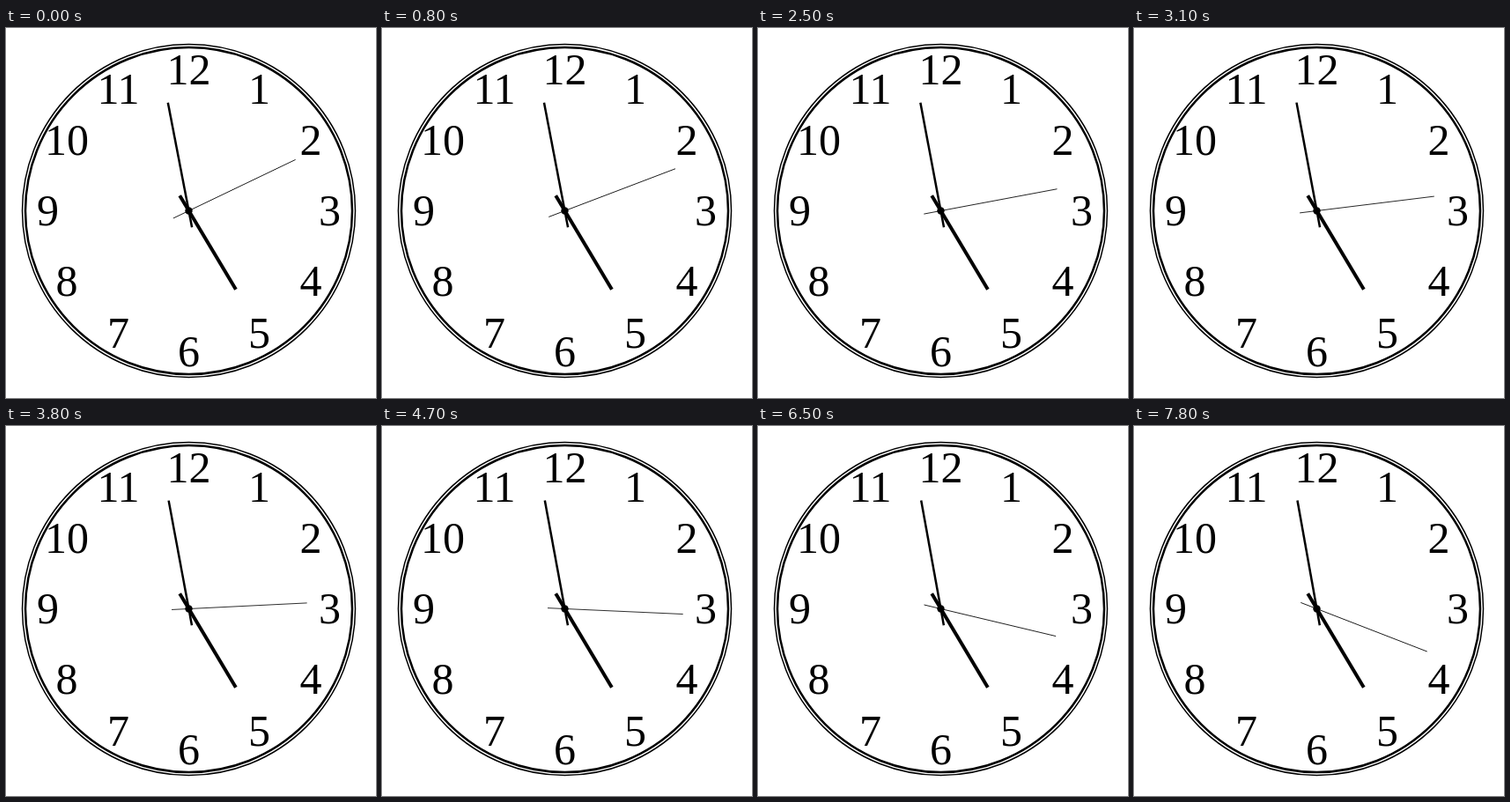
Animation, 420 px wide and 420 px high, one loop 7.9 s. Source, as an HTML page:

```html
<!DOCTYPE html>
<html>
<head>
<meta charset="utf-8">
<style>
html, body { margin: 0; height: 100%; overflow: hidden; background: #fff; }
svg { display: block; width: 100vw; height: 100vh; }
text { font: 50px "Liberation Serif", "Times New Roman", serif; text-anchor: middle; }
circle { fill: none; stroke: #000; }
line { stroke: #000; }
</style>
</head>
<body>
<svg viewBox="-207.5 -207.5 420 420">
  <circle r="189" stroke-width="1.5"/>
  <circle r="185.5" stroke-width="2.5"/>
  <g id="numerals"></g>
  <line id="hour" y1="20" y2="-104" stroke-width="4"/>
  <line id="minute" y1="19" y2="-125" stroke-width="2.5"/>
  <line id="second" y1="19.5" y2="-134.3" stroke-width="0.8"/>
  <circle r="4.2" style="fill: #000; stroke: none"/>
</svg>
<script>
const LOOP = 7900, STEP = 100;
const START = 4 * 3600 + 58 * 60 + 10.73; // seconds past twelve
const byId = id => document.getElementById(id);

let numerals = '';
for (let n = 1; n <= 12; n++) {
  const a = n * Math.PI / 6;
  numerals += `<text x="${160 * Math.sin(a)}" y="${16.7 - 160 * Math.cos(a)}">${n}</text>`;
}
byId('numerals').innerHTML = numerals;

function turn(id, degrees) {
  byId(id).setAttribute('transform', `rotate(${degrees})`);
}

function draw() {
  const elapsed = Math.floor(performance.now() % LOOP / STEP) * STEP;
  const time = START + elapsed / 1000;
  turn('hour', time / 120);
  turn('minute', time / 10 % 360);
  turn('second', time * 6 % 360);
  requestAnimationFrame(draw);
}
draw();
</script>
</body>
</html>
```
